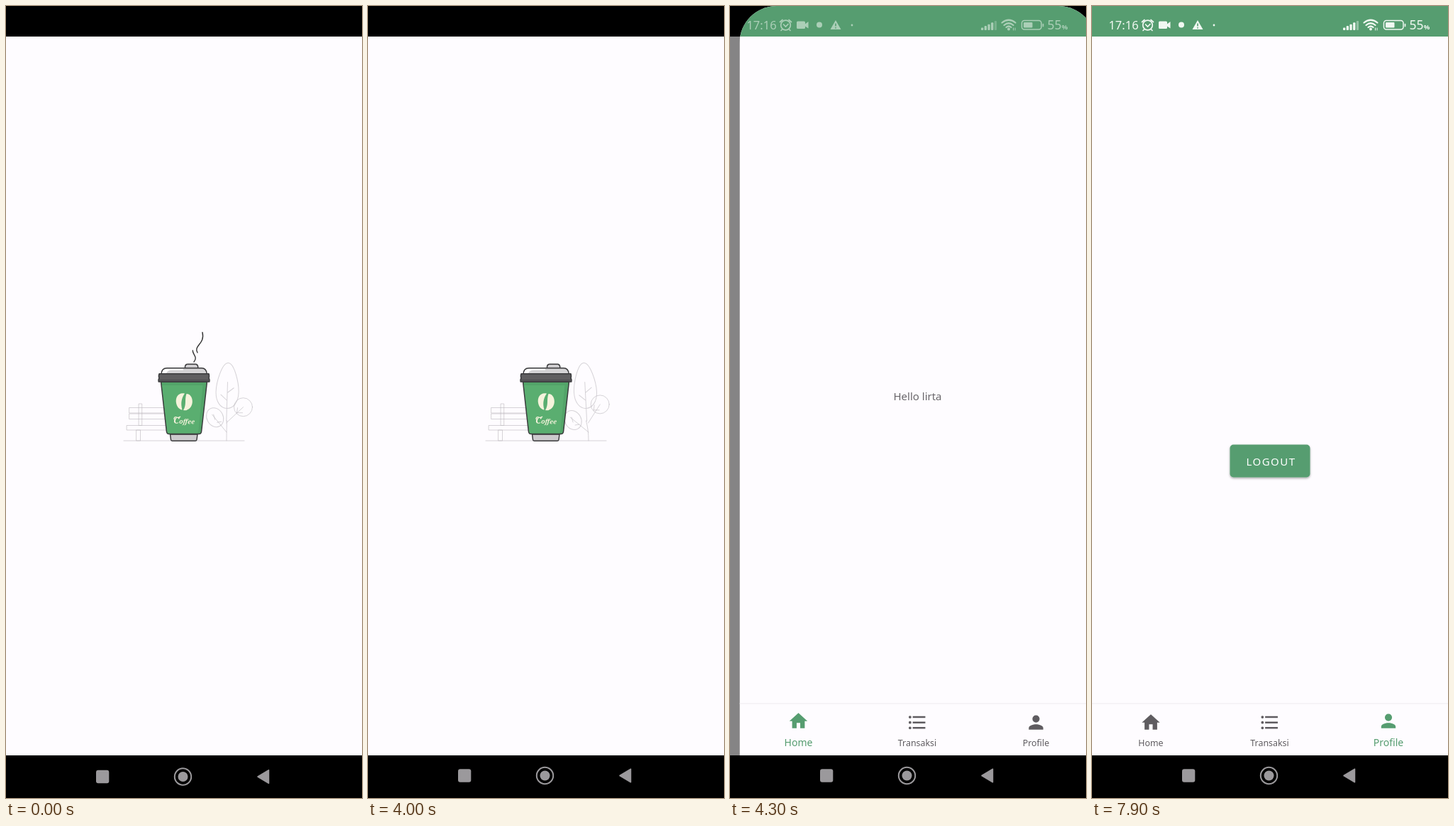
An HTML page for the animation above (8000 ms loop, 502x1115 px).

```html
<!DOCTYPE html>
<html lang="id">
<head>
<meta charset="utf-8">
<title>Coffee app</title>
<style>
  html, body { margin: 0; width: 100%; height: 100%; overflow: hidden; background: #000; }
  svg { display: block; width: 100%; height: 100%; font-family: "Noto Sans", "Open Sans", sans-serif; }
  text { text-anchor: middle; }
  .thin { fill: none; stroke: #bdbabf; stroke-width: 1; stroke-opacity: .62; stroke-linecap: round; }
  .edge { stroke: #3a3a3c; stroke-width: 1.5; stroke-linejoin: round; }
  .steam { fill: none; stroke: #333; stroke-width: 1.4; stroke-linecap: round; }
</style>
</head>
<body>
<svg viewBox="0 0 502 1115" preserveAspectRatio="none">
  <defs>
    <clipPath id="card"><rect id="cardShape" width="502" height="1200" rx="52"/></clipPath>
    <filter id="soft" x="-10%" y="-10%" width="120%" height="140%">
      <feDropShadow dx="0" dy="1.5" stdDeviation="1.5" flood-opacity=".35"/>
    </filter>
  </defs>
  <rect width="502" height="1115"/>

  <g id="splash">
    <rect y="43" width="502" height="1012" fill="#fefcff"/>
    <g class="thin">
      <path d="M166 612H336M174 565.5H224V573H174ZM174 574H225V581.5H174ZM170.5 590.5H229V597H170.5ZM187.5 560H191.7V590.5H187.5ZM184 597H189.5V612H184Z"/>
      <path id="trunk"/>
      <g id="tall">
        <path d="M0 -32C9 -32 16 -4 16 9C16 23 9 32 0 32C-9 32 -16 23 -16 9C-16 -4 -9 -32 0 -32ZM0 -5V50M0 21L-9 13M0 10L9 3"/>
      </g>
      <g id="right"><circle r="13"/><path d="M-9 8L-8 1M-9 8L-1 8"/></g>
      <g id="left"><ellipse rx="11.5" ry="14" transform="rotate(-28)"/><path d="M0 3L-2 -4M3 7L9 6"/></g>
    </g>
    <path id="low" class="steam" pathLength="1" d="M265 501C271 494 263 491 263.3 485"/>
    <path id="high" class="steam" pathLength="1" d="M270 488C264 478 281 476 277 459.5"/>

    <path class="edge" fill="#cbc9cc" d="M231.5 603H270L269 610.5Q268.8 612.3 267 612.3H234.500Q232.700 612.300 232.500 610.500Z"/>
    <path fill="#5aae70" d="M218.500 529H283.500L275.600 599Q275.200 602.500 272 602.500H230Q226.800 602.500 226.400 599Z"/>
    <path fill="#50a067" d="M219 529H283.500L275.600 599Q275.200 602.500 272 602.500H268Q271 601 271.500 598L277.500 534H219.500Z" opacity=".75"/>
    <path class="edge" fill="none" d="M218.500 529H283.500L275.600 599Q275.200 602.500 272 602.500H230Q226.800 602.500 226.400 599Z"/>
    <path class="edge" fill="#cfcdd0" d="M252.500 510V507.500Q253 504.300 256 504.300H267.500Q270 504.300 270.700 507.500V510Z"/>
    <path fill="#d3d2d4" d="M219 518Q219.500 509.800 227 509.800H276Q282.500 509.800 283.300 518Z"/>
    <path fill="#fff" d="M220 517.500Q220.500 510.500 227 510.500H250V512.500H234Q228 512.500 225.500 517.500Z"/>
    <path class="edge" fill="none" d="M219 518Q219.500 509.800 227 509.800H276Q282.500 509.800 283.300 518Z"/>
    <path class="edge" fill="#5f5e60" d="M216 517.800H286Q287 521 286 524Q287.500 526 286.700 529H215.300Q214.500 526 216 524Q214.800 521 216 517.800Z"/>
    <path d="M216 526.800H286" stroke="#48474a" stroke-width="1" fill="none"/>
    <g fill="#f6f3dc">
      <path d="M252 545.500C243 543.500 238.500 551 240 559C241 564 244 568 248.500 568.500C246 559 247.500 552 252 545.500Z"/>
      <path d="M254.500 546C260 546 263.500 552 262.700 558.500C262 565.500 256 570.500 250 569C255 561.500 251.500 554 254.500 546Z"/>
      <text x="251" y="588" font-family="'Noto Serif', serif" font-size="9" font-style="italic" font-weight="700" transform="rotate(2 251 584)"><tspan font-size="12">C</tspan>offee</text>
      <path d="M237 582Q237 577.500 241 579Q244 580 246 578" fill="none" stroke="#f6f3dc" stroke-width="1.300"/>
    </g>
  </g>
  <rect id="dim" width="502" height="1055"/>

  <g id="page"><g clip-path="url(#card)">
    <rect width="502" height="1115" fill="#fefcff"/>
    <rect width="502" height="43" fill="#569d70"/>
    <text id="hello" x="251" y="555" font-size="15" fill="#69666a">Hello lirta</text>
    <g id="logout">
      <rect x="194.500" y="617.500" width="113" height="46" rx="5" fill="#569d70" filter="url(#soft)"/>
      <text x="252.500" y="646.500" font-size="15" letter-spacing="1.500" fill="#fff">LOGOUT</text>
    </g>
    <path d="M0 982H502" stroke="#f3f1f4" stroke-width="1.500"/>
    <circle id="ripple" cx="418" cy="1018" fill="#569d70"/>
    <g id="tabs"></g>
  </g></g>

  <rect y="1055" width="502" height="60"/>
  <g id="keys" fill="#9b999c">
    <rect x="127" y="-9.200" width="18.300" height="18.400" rx="3"/>
    <circle cx="249.500" r="11.700" fill="none" stroke="#9b999c" stroke-width="2"/>
    <circle cx="249.500" r="7"/>
    <path d="M355 0L370.500 -9.300V9.300Z" stroke="#9b999c" stroke-width="1.500" stroke-linejoin="round"/>
  </g>

  <g id="status" fill="#f1f8f2">
    <text x="44.500" y="33" font-size="16.500">17:16</text>
    <g fill="none" stroke="#f1f8f2" stroke-width="1.700" stroke-linecap="round">
      <circle cx="78.500" cy="27" r="6.800"/>
      <path d="M75.500 26L78.500 29L82 25.500M70.500 22.500L74 19.500M86.500 22.500L83 19.500M73.500 33L72 34.500M83.500 33L85 34.500"/>
      <path d="M383.500 23.500Q393 16 402.500 23.500M386.500 27Q393 21.500 399.500 27M389.500 30Q393 27 396.500 30" stroke-width="2.200"/>
      <rect x="411.500" y="20.500" width="27.500" height="12.500" rx="3.500" stroke-width="1.500"/>
      <path d="M441.500 25.500V28.500"/>
      <path d="M399.500 31V34M402 31V34" stroke-width="1"/>
    </g>
    <rect x="94" y="21.500" width="12" height="10.500" rx="1.500"/>
    <path d="M105 26L110.500 22V31.500L105 28Z"/>
    <circle cx="126" cy="26.500" r="4"/>
    <path fill-rule="evenodd" d="M149 20L156.500 33H141.500ZM148.200 24.500V28.500H149.800V24.500ZM148.200 30V31.500H149.800V30Z"/>
    <circle cx="172" cy="27" r="1.400"/>
    <circle cx="393" cy="32.500" r="2"/>
    <g id="bars"></g>
    <rect x="414" y="23" width="12.500" height="7.500" rx="1"/>
    <text x="457.500" y="33" font-size="17.500">55</text>
    <text x="472" y="33" font-size="9.500" font-weight="600">%</text>
  </g>
</svg>
<script>
const LOOP = 8000, STEP = 100;
const $ = id => document.getElementById(id);
const set = (el, attrs) => { for (const k in attrs) el.setAttribute(k, attrs[k]); };
const clamp = v => Math.max(0, Math.min(1, v));
const mix = (a, b, p) => a + (b - a) * p;
const move = (id, x, y, r = 0) => set($(id), { transform: `translate(${x} ${y}) rotate(${r})` });

function track(keys, t) {
  if (t <= keys[0][0]) return keys[0][1];
  for (let i = 1; i < keys.length; i++) {
    const [a, u] = keys[i - 1], [b, v] = keys[i];
    if (t <= b) return mix(u, v, (t - a) / (b - a));
  }
  return keys[keys.length - 1][1];
}

const slide = [[4000, 502], [4100, 221], [4200, 66], [4300, 13.5], [4400, 3.5], [4500, 1], [4600, 0]];
const statusFade = [[4000, 0], [4100, .13], [4200, .34], [4300, .55], [4400, .72], [4600, .93], [4800, 1]];
const select = [[6500, 0], [6600, .5], [6700, 1]];
const ripple = [[6400, 0], [6500, .1], [6700, .12], [7100, 0]];

const tabs = [
  ["Home", 83, "M10 20v-6h4v6h5v-8h3L12 3 2 12h3v8z"],
  ["Transaksi", 250.5, "M7 5h14v2H7zM7 11h14v2H7zM7 17h14v2H7zM2.500 6a1.500 1.500 0 1 0 3 0a1.500 1.500 0 1 0-3 0M2.500 12a1.500 1.500 0 1 0 3 0a1.500 1.500 0 1 0-3 0M2.500 18a1.500 1.500 0 1 0 3 0a1.500 1.500 0 1 0-3 0"],
  ["Profile", 418, "M12 12a4 4 0 1 0 0-8a4 4 0 0 0 0 8zM12 14c-2.670 0-8 1.340-8 4v2h16v-2c0-2.660-5.330-4-8-4z"]
];
$("tabs").innerHTML = tabs.map(([name, x, d]) =>
  `<g><path d="${d}"/><text x="${x}" font-weight="500">${name}</text></g>`).join("");
$("bars").innerHTML = [0, 1, 2, 3, 4].map(i =>
  `<rect x="${354 + i * 4.7}" y="${30.5 - i * 2.4}" width="3.300" height="${3.5 + i * 2.4}" rx="1" opacity="${i < 4 ? 1 : .4}"/>`).join("");

function drawTab(i, on) {
  const [icon, label] = $("tabs").children[i].children;
  const fill = `rgb(${mix(95, 86, on)},${mix(92, 157, on)},${mix(96, 112, on)})`;
  set(icon, { fill, transform: `translate(${tabs[i][1]} ${1008.7 - 2 * on}) scale(1.270) translate(-12 -12)` });
  set(label, { fill, y: 1041.5 + on * .5, "font-size": mix(12.4, 14, on) });
}

function drawTree(t) {
  const s = Math.cos((Math.min(t, 2700) - 1700) * Math.PI / 1000);
  const top = 310 + 4 * s, rx = 331.8 + 4.6 * s, ry = 563.3 + 2.4 * s;
  const lx = 292.6 + 3.5 * s, ly = 580.6 - 2.4 * s;
  move("tall", top, 534.5, 3 * s);
  move("right", rx, ry);
  move("left", lx, ly);
  set($("trunk"), { d: `M311 612Q311 596 ${top - 1.5 * s} 584M310.5 587L${rx} ${ry}M311 600L${lx - 4} ${ly - 4}` });
}

function drawSteam(id, from, to) {
  const len = to - from;
  set($(id), { "stroke-dasharray": `${Math.max(len, .001)} 3`, "stroke-dashoffset": -from, opacity: len > .01 ? 1 : 0 });
}

function draw(t) {
  drawTree(t);
  const u = t % 2000, gone = t >= 3200;
  const wisp = (id, out, outLen, start, len) =>
    gone ? drawSteam(id, 0, 0)
      : u < 1200 ? drawSteam(id, clamp((u - out) / outLen), 1)
      : drawSteam(id, 0, clamp((u - start) / len));
  wisp("low", 100, 700, 1560, 400);
  wisp("high", 300, 900, 1200, 690);

  const x = track(slide, t), p = 1 - x / 502;
  move("splash", -p * 125.5, 0);
  set($("dim"), { opacity: p * .49 });
  move("page", x, 0);
  set($("cardShape"), { rx: x > 0 ? 52 : 0 });
  set($("status"), { opacity: track(statusFade, t) });
  move("keys", 0, t < 100 ? 1085 : 1083.5);

  const sel = track(select, t), profile = t >= 6600;
  set($("hello"), { opacity: profile ? 0 : 1 });
  set($("logout"), { opacity: profile ? 1 : 0 });
  drawTab(0, 1 - sel);
  drawTab(1, 0);
  drawTab(2, sel);
  set($("ripple"), { r: mix(12, 36, clamp((t - 6500) / 250)), opacity: track(ripple, t) });
}

const begin = performance.now();
function tick() {
  const t = (performance.now() - begin) % LOOP;
  draw(Math.floor(t / STEP) * STEP);
  requestAnimationFrame(tick);
}
tick();
</script>
</body>
</html>
```
